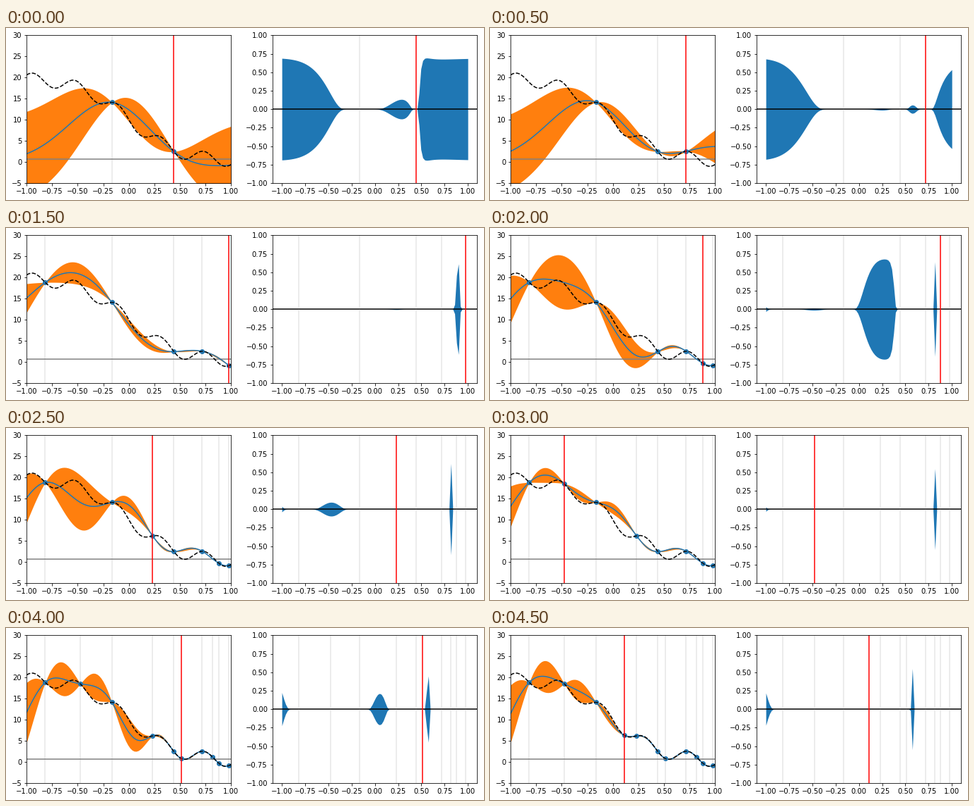
Animation, 676 px wide and 244 px high, one loop 5000 ms. Source, as a matplotlib script:

```python
import math

import numpy as np
import matplotlib.pyplot as plt
from matplotlib.animation import FuncAnimation

W, H, DPI = 676, 244, 72
LEVEL = 0.7
JITTER = 1e-10

grid = np.linspace(-1, 1, 100)
start = np.random.RandomState(1).uniform(-1, 1, 2)
picks = [85, 9, 98, 93, 61, 26, 90, 75, 55]
samples = np.concatenate([start, grid[picks]])
scales = np.geomspace(0.08, 1.5, 600)
cdf = np.vectorize(lambda z: 0.5 * (1 + math.erf(z / math.sqrt(2))))


def truth(x):
    return 10 - 10 * np.tanh(2 * x) - 1.5 * np.sin(15 * x)


def rbf(a, b, scale):
    return np.exp(-(a[:, None] - b[None, :]) ** 2 / (2 * scale ** 2))


def factor(x, y, scale):
    """Cholesky factor, whitened targets and best signal variance."""
    chol = np.linalg.cholesky(rbf(x, x, scale) + JITTER * np.eye(len(x)))
    white = np.linalg.solve(chol, y)
    return chol, white, white @ white / len(x)


def neg_likelihood(x, y, scale):
    chol, _, var = factor(x, y, scale)
    return len(x) * math.log(var) + 2 * np.log(np.diag(chol)).sum()


def posterior(x):
    """Gaussian process fit with maximum-likelihood hyperparameters."""
    y = truth(x)
    scale = min(scales, key=lambda s: neg_likelihood(x, y, s))
    chol, white, var = factor(x, y, scale)
    v = np.linalg.solve(chol, rbf(x, grid, scale))
    left_over = np.clip(1 - (v ** 2).sum(axis=0), 1e-12, None)
    return v.T @ white, np.sqrt(var * left_over)


def entropy(mean, std):
    p = np.clip(cdf((LEVEL - mean) / std), 1e-12, 1 - 1e-12)
    return -p * np.log(p) - (1 - p) * np.log(1 - p)


def add_axes(x0, x1, top=10.4, bottom=219.9):
    return fig.add_axes([x0 / W, 1 - bottom / H, (x1 - x0) / W, (bottom - top) / H])


def mark_samples(ax, x):
    for xi in x[:-1]:
        ax.axvline(xi, color="gray", alpha=0.2)
    ax.axvline(x[-1], color="red")


def draw(i):
    x = samples[:i + 2]
    mean, std = fits[i]
    unc = entropy(mean, std)

    left.clear()
    left.fill_between(grid, mean - std, mean + std, color="C1", linewidth=0)
    left.scatter(x, truth(x), color="C0")
    left.axhline(LEVEL, color="gray")
    left.plot(grid, mean, color="C0")
    left.plot(grid, truth(grid), "k--")
    mark_samples(left, x)
    left.set(xlim=(-1, 1), ylim=(-5, 30),
             xticks=quarters, yticks=range(-5, 31, 5))

    right.clear()
    right.fill_between(grid, -unc, unc, color="C0", linewidth=0)
    right.axhline(0, color="black")
    mark_samples(right, x)
    right.set(xlim=(-1.1, 1.1), ylim=(-1, 1),
              xticks=quarters, yticks=quarters)


quarters = np.linspace(-1, 1, 9)
fits = [posterior(samples[:n]) for n in range(2, len(samples) + 1)]

fig = plt.figure(figsize=(W / DPI, H / DPI), dpi=DPI, facecolor="white")
left = add_axes(29.2, 318.3)
right = add_axes(377.0, 666.3)

anim = FuncAnimation(fig, draw, frames=len(fits), interval=500, repeat=True)
plt.show()
```
